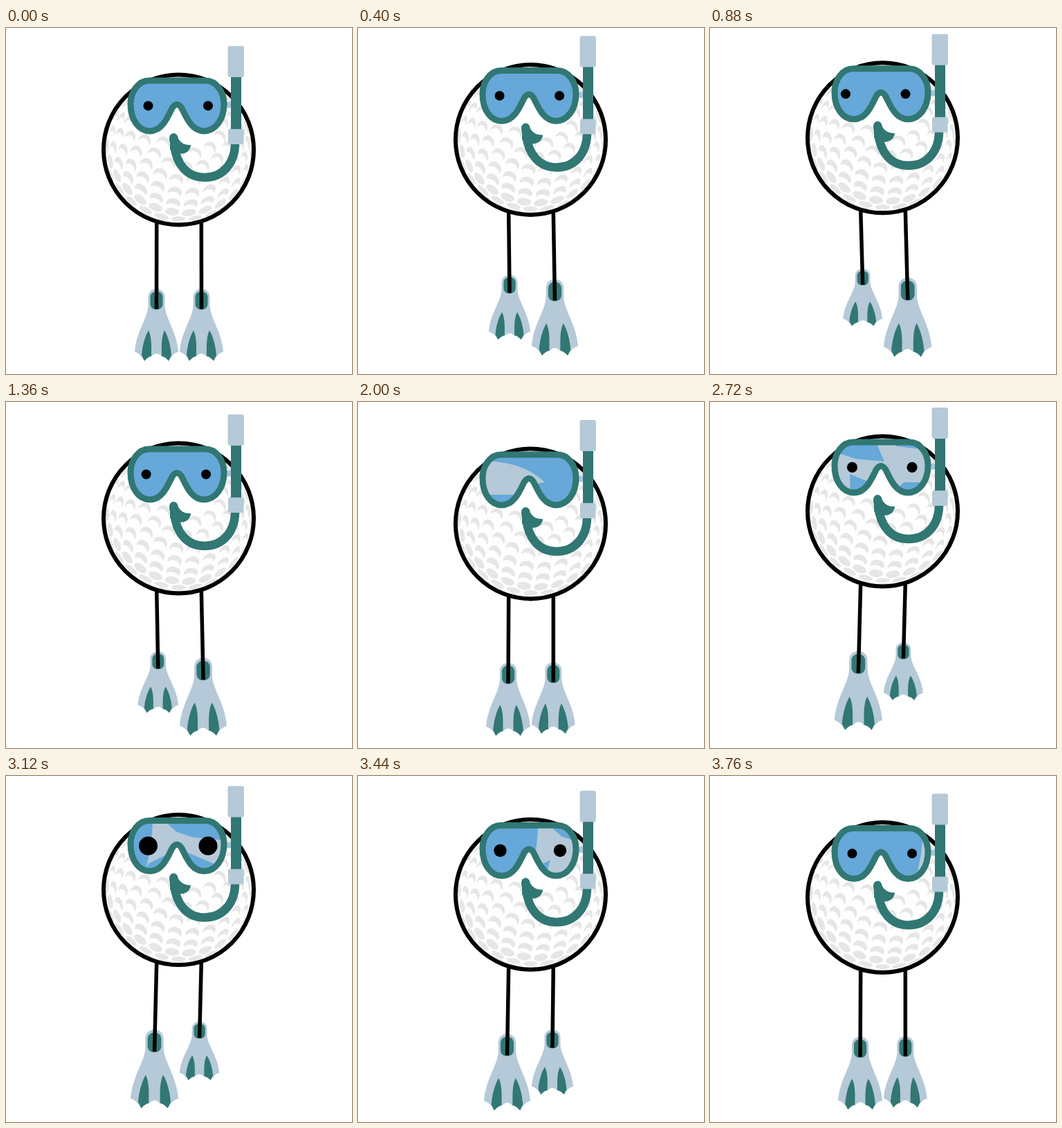
An HTML page with a canvas that plays this animation: 500x500 px, repeating every 3.84 s.

```html
<!DOCTYPE html>
<html lang="en">
<head>
<meta charset="utf-8">
<title>Snorkelling golf ball</title>
<style>
html, body { margin: 0; width: 100%; height: 100%; overflow: hidden; background: #fff; }
canvas { display: block; }
</style>
</head>
<body>
<canvas id="stage" width="500" height="500"></canvas>
<script>
const ctx = document.getElementById('stage').getContext('2d');
const LOOP = 3840, STEP = LOOP / 2, TICK = 80;
const TEAL = '#317773', PALE = '#b5c9d8', BLUE = '#65a8d9', GRAY = '#e6e6e6';
const BALL = { x: 249.5, y: 176, r: 108.5 };

// Smooth 0..1 ramp between two times
function ramp(from, to, t) {
  const k = Math.min(1, Math.max(0, (t - from) / (to - from)));
  return (1 - Math.cos(Math.PI * k)) / 2;
}

function fill(path, color) {
  ctx.fillStyle = color;
  ctx.fill(typeof path === 'string' ? new Path2D(path) : path);
}

function stroke(path, color, width) {
  ctx.strokeStyle = color;
  ctx.lineWidth = width;
  ctx.stroke(typeof path === 'string' ? new Path2D(path) : path);
}

function roundBox(x, y, w, h, r, color) {
  const path = new Path2D();
  path.roundRect(x, y, w, h, r);
  fill(path, color);
}

function disc(x, y, r, color) {
  const path = new Path2D();
  path.arc(x, y, r, 0, Math.PI * 2);
  fill(path, color);
}

// Rings of dimples on a sphere around the highlight
function makeDimples() {
  const list = [];
  const pole = [0.14, -0.42, 0.897], u = [0.988, 0, -0.154], v = [0.065, 0.908, 0.415];
  for (let ring = 0, theta = 0.5; theta < 2; ring++, theta += 0.19) {
    const count = Math.round(2 * Math.PI * Math.sin(theta) / 0.235);
    for (let i = 0; i < count; i++) {
      const phi = (i + (ring % 2) / 2) / count * 2 * Math.PI;
      const [nx, ny, nz] = pole.map((p, k) => p * Math.cos(theta) +
        Math.sin(theta) * (u[k] * Math.cos(phi) + v[k] * Math.sin(phi)));
      if (nz < 0.08) continue;
      const x = BALL.x + nx * 107, y = BALL.y + ny * 107;
      const ellipse = (dx, dy, size) => {
        const path = new Path2D();
        path.ellipse(x + dx, y + dy, size * nz, size, Math.atan2(ny, nx), 0, Math.PI * 2);
        return path;
      };
      list.push({
        outer: ellipse(0, 0, 10.5),
        inner: theta < 1.3 ? ellipse(-2.5, 5.5 + (theta - 0.5) * 3, 10.5) : null
      });
    }
  }
  return list;
}
const dimples = makeDimples();

function drawBall() {
  const { x, y, r } = BALL;
  disc(x, y, r, '#fff');
  for (const d of dimples) {
    ctx.save();
    ctx.clip(d.outer);
    fill(d.outer, GRAY);
    if (d.inner) fill(d.inner, '#fff');
    ctx.restore();
  }
  const rim = new Path2D();
  rim.arc(x, y, r, 0, Math.PI * 2);
  stroke(rim, '#000', 6);
}

// Origin: inner edge of the fin at its top; side -1 is left
function drawLeg(side, bob, sx, sy, top) {
  const y = 377 + bob + top, x = 250 + side * 32.5 * sx;
  ctx.save();
  ctx.translate(250, y);
  ctx.scale(side * sx, sy);
  fill('M20.5 12C20.5 -4 44.5 -4 44.5 12V24C45 42 62 62 64 91' +
    'Q56 93 50 104Q44 98 40 98Q32 89 25 98Q20 98 15 104' +
    'Q9 93 1 91C3 62 20 42 20.5 24Z', PALE);
  roundBox(23.5, 4, 18, 26, 8, TEAL);
  const blade = 'M44 60C39 70 40 86 40 97Q45 98 50 104L54 96C53 82 49 68 44 60Z';
  fill(blade, TEAL);
  ctx.translate(65, 0);
  ctx.scale(-1, 1);
  fill(blade, TEAL);
  ctx.restore();
  const leg = new Path2D();
  leg.moveTo(250 + side * 32.3, 280 + bob);
  leg.lineTo(x, y + 29 * sy);
  stroke(leg, '#000', 5.5);
}

function drawLegs(t, bob) {
  const wave = Math.sin(Math.PI * (t % STEP) / STEP);
  const lift = Math.pow(wave, 1.5);
  const raised = t < STEP ? -1 : 1;
  drawLeg(raised, bob, 1 - 0.1 * lift, 1 - 0.21 * lift, -12 * lift);
  drawLeg(-raised, bob, 1 + 0.1 * wave, 1 + 0.1 * wave, wave);
}

const lens = new Path2D('M207 76H288C304 76 315 92 315 110C315 133 302 149 286 149' +
  'C268 149 260 128 254 116Q247 105 240 116C234 128 226 149 208 149' +
  'C192 149 180 133 180 110C180 92 191 76 207 76Z');

function drawGlint(t) {
  ctx.save();
  ctx.clip(lens);
  ctx.translate(270 + 0.15 * (t - 2000), 0);
  fill('M0 116Q-25 92 -65 87L-108 82L-118 70H-226Q-226 115 -238 152H-118' +
    'L-98 134H-45Q-20 118 0 116Z', PALE);
  fill('M-216 70L-138 76L-126 104L-168 100L-192 92Z', BLUE);
  fill('M-176 122L-138 138L-150 152H-175Z', BLUE);
  fill('M-232 138L-208 126L-216 152H-240Z', BLUE);
  ctx.restore();
}

function drawEyes(t) {
  const look = -9.5 * (ramp(320, 720, t) - ramp(960, 1600, t));
  const blink = ramp(1760, 1980, t) - ramp(2020, 2240, t);
  const wide = ramp(2640, 3040, t) - ramp(3200, 3600, t);
  const r = 7 * (1 - blink) + 6.5 * wide;
  for (const x of [205.5, 292]) disc(x + look, 112.5, r, '#000');
}

function drawGoggles(t) {
  roundBox(316, 107, 12, 8.5, 0, '#a3c7df');
  fill(lens, BLUE);
  drawGlint(t);
  drawEyes(t);
  stroke(lens, TEAL, 9);
}

function drawSnorkel() {
  stroke('M331 160C333 197 312 216 287 216C262 216 246 198 243 168', TEAL, 12.5);
  fill('M237 166C234 156 238 152 243 152Q248 153 249 160Q255 170 267 169' +
    'C267 178 257 184 249 181L237 176Z', TEAL);
  roundBox(325, 66, 15, 84, 0, TEAL);
  roundBox(320.5, 26, 23.5, 45, 3, PALE);
  roundBox(321, 146, 22.5, 22, 3, PALE);
}

function draw(t) {
  const p = t % STEP;
  // Quick rise, slow sink that runs on into the next step
  const bob = p < 60
    ? -19 * (1 - ramp(600, 1980, p + STEP))
    : -19 * (ramp(60, 560, p) - ramp(600, 1980, p));
  ctx.fillStyle = '#fff';
  ctx.fillRect(0, 0, 500, 500);
  drawLegs(t, bob);
  ctx.save();
  ctx.translate(0, bob);
  drawBall();
  drawGoggles(t);
  drawSnorkel();
  ctx.restore();
}

const start = performance.now();
function frame() {
  const t = (performance.now() - start) % LOOP;
  draw(Math.floor(t / TICK) * TICK);
  requestAnimationFrame(frame);
}
frame();
</script>
</body>
</html>
```
